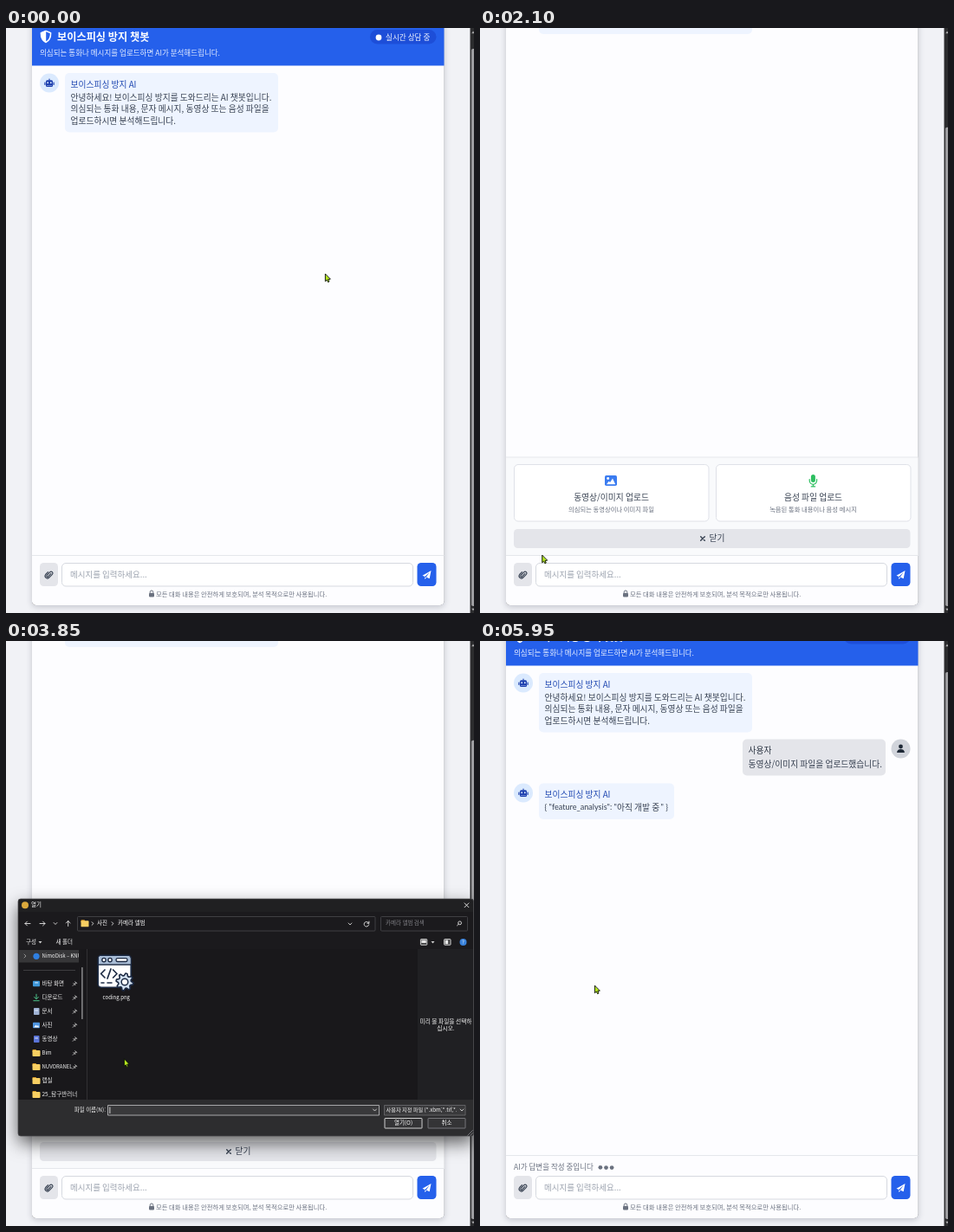
Write an HTML page with a canvas that moves like this. It is 540 px wide and 676 px high and loops after 6000 ms.

```html
<!DOCTYPE html>
<html lang="ko">
<head>
<meta charset="utf-8">
<title>챗봇 데모</title>
<style>
html, body { margin: 0; width: 100%; height: 100%; overflow: hidden; background: #f1f2f6; }
canvas { display: block; width: 540px; height: 676px; }
</style>
</head>
<body>
<canvas id="stage"></canvas>
<script>
const W = 540, H = 676, LOOP = 6000;
const SANS = '"Noto Sans CJK KR", "Noto Sans CJK", "Noto Sans", sans-serif';
const LATIN = 'Lato, "Open Sans", sans-serif';
const BASE = 9.76, SMALL = 8.54, TINY = 7.32, UI = 6.5;
const PANEL_H = 113.5, TYPING_H = 15;

const canvas = document.getElementById('stage');
const ctx = canvas.getContext('2d');
const dpr = window.devicePixelRatio || 1;
canvas.width = W * dpr;
canvas.height = H * dpr;

const clamp = (v) => Math.max(0, Math.min(1, v));
const span = (t, a, b) => clamp((t - a) / (b - a));
const smooth = (p) => p * p * (3 - 2 * p);
const within = (t, a, b) => t >= a && t < b;

function text(str, x, y, size, color, { align = 'left', weight = 400, font = SANS } = {}) {
  ctx.font = `${weight} ${size}px ${font}`;
  ctx.textAlign = align;
  ctx.textBaseline = 'middle';
  ctx.fillStyle = color;
  ctx.fillText(str, x, y);
}

function rect(x, y, w, h, fill, r = 0, stroke, lw = 1) {
  ctx.beginPath();
  ctx.roundRect(x, y, w, h, r);
  if (fill) { ctx.fillStyle = fill; ctx.fill(); }
  if (stroke) { ctx.strokeStyle = stroke; ctx.lineWidth = lw; ctx.stroke(); }
}

function circle(x, y, r, fill, stroke, lw = 1) {
  ctx.beginPath();
  ctx.arc(x, y, r, 0, Math.PI * 2);
  if (fill) { ctx.fillStyle = fill; ctx.fill(); }
  if (stroke) { ctx.strokeStyle = stroke; ctx.lineWidth = lw; ctx.stroke(); }
}

function path(d, x, y, fill, stroke, lw = 1) {
  const p = new Path2D(d);
  ctx.save();
  ctx.translate(x, y);
  ctx.lineJoin = ctx.lineCap = 'round';
  if (fill) { ctx.fillStyle = fill; ctx.fill(p); }
  if (stroke) { ctx.strokeStyle = stroke; ctx.lineWidth = lw; ctx.stroke(p); }
  ctx.restore();
}

function shadow(x, y, w, h, r, blur, dy, color) {
  ctx.save();
  ctx.beginPath();
  ctx.rect(-100, -200, W + 200, H + 500);
  ctx.roundRect(x, y, w, h, r);
  ctx.clip('evenodd');
  ctx.shadowColor = color;
  ctx.shadowBlur = blur * dpr;
  ctx.shadowOffsetY = dy * dpr;
  rect(x, y, w, h, '#000', r);
  ctx.restore();
}

// ---- page ----

function robot(x, y) {
  const c = '#1e40af', eye = '#dbeafe';
  circle(x, y, 11, eye);
  rect(x - 4, y - 3.2, 8, 7.6, c, 1.5);
  rect(x - 5.7, y - 1, 1.2, 3.6, c, 0.5);
  rect(x + 4.5, y - 1, 1.2, 3.6, c, 0.5);
  rect(x - 0.6, y - 5, 1.2, 2, c, 0.5);
  circle(x - 1.8, y - 0.2, 0.95, eye);
  circle(x + 1.8, y - 0.2, 0.95, eye);
  for (let i = -1; i <= 1; i++) rect(x + i * 2 - 0.55, y + 2.4, 1.1, 0.8, eye);
}

function header() {
  rect(30, -40, 475.5, 83.5, '#2560eb');
  path('M0-6.6 5.6-4.3C5.7.6 3.8 4.6 0 6.5-3.8 4.6-5.7.6-5.6-4.3z', 46, 10, null, '#fff', 1.5);
  path('M.2-7-6-4.5C-6 1-4 5 .2 7z', 46, 10, '#fff');
  text('보이스피싱 방지 챗봇', 59, 10, 12.2, '#fff', { weight: 700 });
  text('의심되는 통화나 메시지를 업로드하면 AI가 분석해드립니다.', 39, 29, SMALL, '#e6eeff');
  rect(420, 2, 76.5, 16.5, '#1d4ed8', 8.2);
  circle(430, 11, 3.4, '#fff');
  text('실시간 상담 중', 438, 10.5, 8.6, '#f1f5ff');
}

function messages(t) {
  const ink = '#374151', name = '#1e46b0', pale = '#eef4ff';
  robot(50, 63.5);
  rect(68, 52, 246, 68.5, pale, 5);
  text('보이스피싱 방지 AI', 74.5, 65, BASE, name);
  text('안녕하세요! 보이스피싱 방지를 도와드리는 AI 챗봇입니다.', 74.5, 80, BASE, ink);
  text('의심되는 통화 내용, 문자 메시지, 동영상 또는 음성 파일을', 74.5, 93.4, BASE, ink);
  text('업로드하시면 분석해드립니다.', 74.5, 106.8, BASE, ink);
  if (t >= 4850) {
    rect(303, 128.5, 165, 42, '#e4e5ea', 5);
    text('사용자', 309.5, 141, BASE, '#2b3442');
    text('동영상/이미지 파일을 업로드했습니다.', 309.5, 157, BASE, ink);
    circle(485.5, 139.5, 11, '#d1d4db');
    circle(485.5, 137, 2.4, '#1f2937');
    path('M-4.4 4.6C-4.4 1.7-2.6.6 0 .6S4.4 1.7 4.4 4.6z', 485.5, 139.5, '#1f2937');
  }
  if (t >= 5000) {
    robot(50, 190.5);
    rect(68, 179.5, 156, 41.5, pale, 5);
    text('보이스피싱 방지 AI', 74.5, 192.5, BASE, name);
    text('{ "feature_analysis": "', 74.5, 207.5, 9.1, ink, { font: LATIN });
    text('아직 개발 중', 158, 207.5, BASE, ink);
    text('" }', 217, 207.5, 9.1, ink, { font: LATIN, align: 'right' });
  }
}

function uploadCard(x, title, note) {
  rect(x + 0.5, 618, 224.5, 65.5, '#fff', 4.5, '#dfe1e8');
  text(title, x + 112.5, 655.5, BASE, '#374151', { align: 'center' });
  text(note, x + 112.5, 669.5, TINY, '#6b7280', { align: 'center' });
}

// Drawn just below the chat area, whose lower edge is y = 609.5.
function panel() {
  rect(30, 610, 475.5, PANEL_H, '#f9fafc');
  rect(30, 609, 475.5, 1, '#e5e7eb');
  uploadCard(39, '동영상/이미지 업로드', '의심되는 동영상이나 이미지 파일');
  uploadCard(272, '음성 파일 업로드', '녹음된 통화 내용이나 음성 메시지');
  rect(144, 630.5, 14, 12, '#3b7cf0', 1.8);
  circle(147.7, 634, 1.4, '#fff');
  path('M-5 4.2-2.3.8-.9 2 2-2.4 5.2 4.2z', 151, 636.5, '#fff');
  const green = '#2dbf60';
  rect(381.9, 629.5, 5, 9, green, 2.5);
  path('M-4.2-1V.6a4.2 4.2 0 0 0 8.4 0V-1M0 5V7.4M-2.2 7.4H2.2', 384.4, 636, null, green, 1.2);
  rect(39, 692.5, 457.5, 22, '#e4e5ea', 4.5);
  path('M-2.3-2.3 2.3 2.3M2.3-2.3-2.3 2.3', 257, 703.5, null, '#374151', 1.4);
  text('닫기', 264.5, 703, BASE, '#374151');
}

function typing(t) {
  text('AI가 답변을 작성 중입니다', 39, 623, SMALL, '#6b7280');
  for (let i = 0; i < 3; i++) {
    const phase = (t - 5150 - i * 150) / 450;
    const p = phase < 0 ? 1 : phase % (750 / 450);
    const lift = p < 1 ? 2.6 * Math.sin(p * Math.PI) ** 2 : 0;
    circle(138.9 + i * 6.6, 623.6 - lift, 2.4, '#6b7280');
  }
}

function inputRow(hover) {
  const shade = (a, b) => Math.round(a + (b - a) * hover);
  rect(39, 618, 21, 27, `rgb(${shade(228, 209)},${shade(229, 211)},${shade(234, 217)})`, 4.5);
  path('M2.2-1.6-1.1 2a1 1 0 0 1-1.5-1.5L1-3.3a1.9 1.9 0 0 1 2.7 2.7L-.2 3.3a2.7 2.7 0 0 1-3.8-3.8L-1.2-3.4',
    49.7, 632, null, '#374151', 1.15);
  rect(64.5, 618.5, 405, 26.5, '#fff', 4.5, '#d6d9e0');
  text('메시지를 입력하세요...', 74, 631.5, 9.5, '#9ca3af');
  rect(474.5, 618, 22, 27, '#2560eb', 4.5);
  path('M5-5-5 .8-2.2 2 3.2-3-.8 2.6 3.2 4.2zM-2.2 2.6V5L-.4 3.3z', 485.5, 632, '#fff');
  rect(165, 653, 6, 4.4, '#6b7280', 0.8);
  path('M-1.8 0V-1.2a1.8 1.8 0 0 1 3.6 0V0', 168, 653, null, '#6b7280', 1);
  text('모든 대화 내용은 안전하게 보호되며, 분석 목적으로만 사용됩니다.', 173, 654, TINY, '#6b7280');
}

function scrollbar(extra, scroll) {
  const h = 644 - 0.8 * extra, end = 668 - 0.82 * (extra - scroll);
  rect(535.5, 0, 4.5, H, '#2b2b2d');
  rect(537, end - h, 4.5, h, '#9d9da0', 1.8);
  path('M-1.8 1.2 0-1.6 1.8 1.2z', 539, 5, '#a6a6a8');
  path('M-1.8-1.2 0 1.6 1.8-1.2z', 539, 672, '#a6a6a8');
}

function page(t) {
  const open = within(t, 1550, 4850), busy = t >= 4850;
  const extra = open ? PANEL_H : busy ? TYPING_H : 0;
  const scroll = open ? PANEL_H * smooth(span(t, 1580, 2000)) : extra;
  const hover = t < 1550 ? span(t, 1200, 1330) : 0;
  rect(0, 0, W, H, '#f1f2f6');
  ctx.save();
  ctx.translate(0, -scroll);
  shadow(30, -40, 475.5, 707 + extra, 5, 7, 2, 'rgba(30,35,60,.22)');
  rect(30, -40, 475.5, 707 + extra, '#fdfdff', 5);
  header();
  messages(t);
  if (open) panel();
  if (busy) typing(t);
  rect(30, 609 + (open ? PANEL_H : 0), 475.5, 1, '#e5e7eb');
  ctx.translate(0, extra);
  inputRow(hover);
  ctx.restore();
  scrollbar(extra, scroll);
}

// ---- file dialog ----

function codeIcon(x, y, size) {
  const ink = '#1d2b44';
  ctx.save();
  ctx.translate(x, y);
  ctx.scale(size / 42, size / 42);
  rect(1.2, 1.2, 38, 37, '#fff', 4, ink, 1.6);
  rect(2, 2, 36.4, 9.5, '#a9bdd6', [3, 3, 0, 0]);
  rect(1.2, 11.2, 38, 1.5, ink);
  circle(8, 6.6, 2.2, '#fff', ink, 1.4);
  circle(15, 6.6, 2.2, '#fff', ink, 1.4);
  rect(22, 4.7, 13, 3.8, '#fff', 1.9, ink, 1.3);
  path('M9 18 4.6 22.5 9 27M16 17 12 28M18.6 18 23 22.5 18.6 27', 0, 0, null, ink, 1.7);
  path('M5 33H8M12 33H17', 0, 0, null, ink, 1.6);
  ctx.translate(32, 32);
  ctx.beginPath();
  for (let i = 0; i < 32; i++) {
    const a = (i + 0.5) / 32 * Math.PI * 2, r = i % 4 < 2 ? 10 : 7.4;
    ctx.lineTo(Math.cos(a) * r, Math.sin(a) * r);
  }
  ctx.closePath();
  ctx.lineJoin = 'round';
  ctx.fillStyle = '#d5e3f2';
  ctx.strokeStyle = ink;
  ctx.lineWidth = 1.6;
  ctx.fill();
  ctx.stroke();
  circle(0, 0, 3.8, '#fff', ink, 1.5);
  ctx.restore();
}

function folder(x, y) {
  rect(x, y - 4, 4.5, 3, '#d99a26', 0.8);
  rect(x, y - 3, 9, 7, '#f8cf62', 0.9);
}

const chevron = (x, y) => path('M-1.9-1 0 1 1.9-1', x, y, null, '#d8d8d8', 0.9);
const caretDown = (x, y) => path('M-2-1H2L0 1.4z', x, y, '#d0d0d0');

const places = [
  ['바탕 화면', '#3f97d8'], ['다운로드', null], ['문서', '#9fb2d4'], ['사진', '#4d94e0'],
  ['동영상', '#5b74d8'], ['Bim', 'folder'], ['NUVORANEL', 'folder'], ['랩실', 'folder'], ['25_탐구반러너', 'folder']
];

function sidebar() {
  rect(15, 357, 69, 14.5, '#363638');
  path('M-1-2 1 0-1 2', 22, 364, null, '#aaa', 0.8);
  circle(35, 364.3, 3.6, '#2f7fe0');
  ctx.save();
  ctx.beginPath();
  ctx.rect(14, 340, 70, 190);
  ctx.clip();
  text('NimoDisk – KNU', 41.5, 364, 6, '#f0f0f0');
  places.forEach(([label, kind], i) => {
    const y = 396 + i * 16;
    if (kind === 'folder') folder(30.5, y);
    else if (kind) {
      const tall = i === 2 || i === 4;
      rect(tall ? 32 : 31, y - (tall ? 4 : 3.2), tall ? 6.5 : 8, tall ? 8 : 6.4, kind, 0.8);
      if (i === 3) path('M-3 2.4-.6-.6 1 1 2-.2 3.2 2.4z', 35, y, '#e8f2ff');
      else rect(33.3, y - 1.6, 3.6, 1, '#e8f0ff');
    } else path('M0-3.8V1.6M-2.4-.6 0 1.8 2.4-.6M-3.2 3.7H3.2', 35, y, null, '#4cc38a', 1);
    text(label, 41.5, y, i > 4 && i < 7 ? 6 : UI, '#f4f4f4');
    if (i < 7) path('M.2-2.4 2.4-.2M1-1.6-.6 0M1.6-.8 0 .8M-1.7-.5.5 1.7M-.6.6-2.4 2.4', 79.5, y, null, '#b5b5b5', 0.9);
  });
  ctx.restore();
  rect(20, 380, 60, 0.8, '#4a4a4c');
  rect(87.3, 377, 1.2, 60, '#a5a5a7', 0.6);
  rect(93, 356, 0.8, 174, '#38383a');
}

function toolbars() {
  const ink = '#e6e6e6', dim = '#7f7f84';
  path('M3 0H-3M-.6-2.4-3 0-.6 2.4', 25, 326.5, null, ink, 0.9);
  path('M-3 0H3M.6-2.4 3 0 .6 2.4', 42, 326.5, null, ink, 0.9);
  chevron(57, 326.5);
  path('M0 3V-3M-2.4-.6 0-3 2.4-.6', 71.7, 326.5, null, ink, 0.9);
  rect(82.5, 318.5, 343.5, 16.5, null, 1, '#444448', 0.9);
  folder(86.5, 326.3);
  path('M-.9-1.8.9 0-.9 1.8', 100, 326.5, null, ink, 0.9);
  text('사진', 105, 326, UI, '#fff');
  path('M-.9-1.8.9 0-.9 1.8', 123, 326.5, null, ink, 0.9);
  text('카메라 앨범', 129, 326, UI, '#fff');
  chevron(397, 327);
  path('M2.6-.8A2.8 2.8 0 1 0 2.7.9M2.9-2.9V-.8H.8', 416, 327, null, ink, 0.9);
  rect(432.5, 318.5, 100, 16.5, null, 1, '#444448', 0.9);
  text('카메라 앨범 검색', 438, 326, UI, dim);
  circle(523.6, 325.8, 1.9, null, ink, 0.9);
  path('M-1.4 1.4-3 3', 523.6, 325.8, null, ink, 0.9);
  text('구성', 23, 348, UI, '#f4f4f4');
  caretDown(39.5, 348);
  text('새 폴더', 57.5, 348, UI, '#f4f4f4');
  rect(478.4, 344.6, 7.4, 6.6, '#3a3a3c', 0.6, ink, 0.9);
  rect(479.4, 345.6, 5.4, 3.4, '#e6e6e6');
  caretDown(492.5, 348);
  rect(505.6, 344.6, 7.4, 6.6, '#3a3a3c', 0.6, ink, 0.9);
  rect(506.6, 345.6, 3.6, 4.6, '#e6e6e6');
  circle(527.5, 348, 4, '#3a83dc');
  text('?', 527.5, 348, 6, '#fff', { align: 'center' });
}

function dialogFooter(chosen) {
  text('파일 이름(N):', 115, 541.5, UI, '#f4f4f4', { align: 'right' });
  rect(117.5, 536.5, 313, 11.5, '#39393b', 0, '#b4b4b6', 0.9);
  if (chosen) text('coding.png', 120, 542, 6.2, '#fff');
  else rect(119.5, 538.5, 0.8, 7.5, '#fff');
  chevron(425.5, 542);
  rect(436.5, 536.5, 93.5, 11.5, '#39393b', 0, '#6c6c70', 0.8);
  text('사용자 지정 파일 (*.xbm;*.tif;*.', 438.5, 542, 6.2, '#f4f4f4');
  chevron(526, 542);
  rect(437, 551.5, 43, 11.5, '#343436', 0.5, '#e2e2e2', 0.9);
  text('열기(O)', 458.5, 557, UI, '#fff', { align: 'center' });
  rect(487, 551.5, 43, 11.5, '#343436', 0.5, '#8a8a8e', 0.8);
  text('취소', 508.5, 557, UI, '#fff', { align: 'center' });
  path('M3-3-3 3M3 0 0 3', 535.5, 568.5, null, '#8a8a8e', 0.8);
}

function titleBar(closing) {
  rect(14, 298, 525.5, 15, '#202022', [3, 3, 0, 0]);
  if (!closing) circle(22, 305.3, 4, '#dba93c');
  text('열기', closing ? 18 : 29, 305, UI, '#fff');
  path('M-2.4-2.4 2.4 2.4M2.4-2.4-2.4 2.4', 531.5, 305.3, null, '#f0f0f0', 0.9);
}

// Unpainted controls shown in the first moment of opening.
function blankDialog() {
  rect(14, 530, 525.5, 42, '#2c2c2e');
  ctx.globalAlpha = 1;
  [[79.5, 538.5, 36, 7.5], [117, 536, 314, 12], [436, 536, 94, 12],
   [437, 551, 44, 13], [487, 551, 44, 13], [531, 564, 8.5, 8]].forEach((b) => rect(...b, '#fff'));
  rect(14, 298, 525.5, 274, null, 3, 'rgba(90,90,95,.35)', 0.8);
}

function dialogBody(t) {
  const chosen = t >= 4150, preview = t >= 4550;
  rect(14, 313, 525.5, 43, '#1b1a1d');
  rect(14, 356, 461, 174, '#19181b');
  rect(475, 356, 64.5, 174, '#202023');
  rect(14, 530, 525.5, 42, '#2d2d2f', [0, 0, 3, 3]);
  toolbars();
  sidebar();
  if (chosen) rect(101.4, 359.4, 52, 56.5, '#77777a', 0, '#a8a8aa', 0.8);
  else if (t >= 4000) rect(101, 359, 53, 57, '#4a4a4c');
  codeIcon(105, 362, 42);
  text('coding.png', 127.3, 411.5, 6, '#fff', { align: 'center' });
  if (preview) {
    rect(486, 418.5, 46.5, 46.5, '#1e1e20');
    codeIcon(487.5, 420, 43.5);
  } else {
    text('미리 볼 파일을 선택하', 507.5, 439, 6.7, '#f4f4f4', { align: 'center' });
    text('십시오.', 507.5, 447, 6.7, '#f4f4f4', { align: 'center' });
  }
  dialogFooter(chosen);
  rect(14, 298, 525.5, 274, null, 3, '#4a4a4d', 0.7);
}

function dialog(t) {
  if (!within(t, 3350, 4850)) return;
  const closing = t >= 4650;
  const enter = (1 - span(t, 3350, 3600)) ** 3;
  const leave = span(t, 4650, 4850) ** 1.7;
  const scale = 1 - 0.098 * enter - 0.052 * leave;
  const alpha = 1 - 0.6 * enter - leave;
  ctx.save();
  ctx.translate(276.75 - 3.7 * enter, 435 - 1.5 * enter);
  ctx.scale(scale, scale);
  ctx.translate(-276.75, -435);
  ctx.globalAlpha = alpha;
  shadow(14, 298, 525.5, 274, 3, 20, 8, 'rgba(0,0,0,.62)');
  titleBar(closing);
  if (t < 3400) blankDialog();
  else dialogBody(t);
  ctx.restore();
}

// ---- pointer ----

const track = [
  [400, 368, 284], [550, 318, 340], [700, 215, 455], [850, 128, 545], [1050, 70, 593],
  [1200, 52, 620], [1350, 45, 628], [1850, 45, 628], [2000, 57, 621], [2100, 71, 609.5],
  [2150, 87, 587], [2300, 118, 545], [2450, 128, 533], [3600, 128, 533], [3850, 136, 483],
  [3950, 135, 452], [4100, 132, 402], [4200, 132, 398], [6000, 132, 398]
];

function pointerAt(t) {
  if (t <= track[0][0]) return track[0].slice(1);
  const i = track.findIndex((k) => k[0] >= t);
  const [t0, x0, y0] = track[i - 1], [t1, x1, y1] = track[i];
  const p = (t - t0) / (t1 - t0);
  return [x0 + (x1 - x0) * p, y0 + (y1 - y0) * p];
}

function pointer(t) {
  const [x, y] = pointerAt(t);
  if (within(t, 1200, 1950) || within(t, 2150, 2750)) {
    path('M-.9.6C-.9-.6 1-.6 1 .6V4l4 .9c1.2.3 1.5 1 1.3 2L5.4 11H-.6L-3.6 7c-.6-1 .5-1.9 1.4-1.2l1.3 1z',
      x, y, '#e6f02c', '#1c2208', 0.9);
  } else {
    path('M.4.4V8.8L2.3 7.1 3.6 9.7 5 9 3.8 6.5 6 6.2z', x, y, '#b4e61e', '#10180a', 0.95);
  }
}

function frame() {
  const t = performance.now() % LOOP;
  ctx.setTransform(dpr, 0, 0, dpr, 0, 0);
  page(t);
  dialog(t);
  pointer(t);
  requestAnimationFrame(frame);
}
frame();
</script>
</body>
</html>
```
